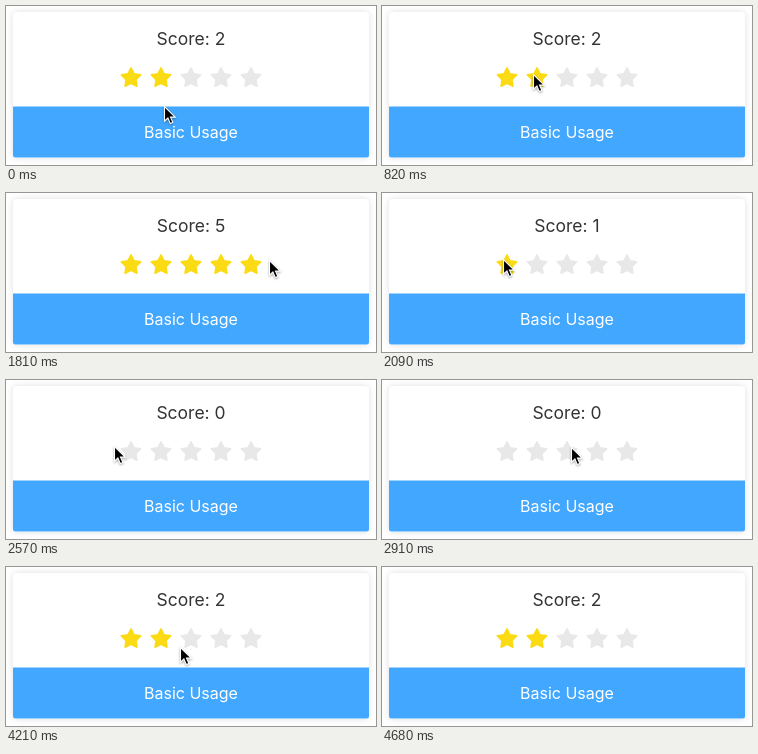
An HTML page that plays this animation: 370 px wide and 159 px high, repeating every 5230 ms.

```html
<!DOCTYPE html>
<html lang="en">
<head>
<meta charset="utf-8">
<title>Star rating</title>
<style>
  html, body { margin: 0; height: 100%; overflow: hidden; background: #fff; }
  svg { display: block; width: 370px; height: 159px; }
  text { font-family: Inter, sans-serif; text-anchor: middle; }
  .card { fill: #fff; filter: drop-shadow(0 0 3px rgba(0, 0, 0, .13)); }
  .star { stroke-width: 1.6; stroke-linejoin: round; }
</style>
</head>
<body>
<svg viewBox="0 0 370 159">
  <rect class="card" x="7" y="6" width="356" height="146" rx="4"/>
  <path d="M7 100.5H363V149q0 2.5-2.5 2.5H9.5Q7 151.5 7 149z" fill="#42a7ff"/>
  <text id="score" x="185" y="39" font-size="17.5" fill="#333"></text>
  <text x="185" y="132" font-size="16" fill="#fff">Basic Usage</text>
  <g id="stars"></g>
  <g id="cursor" style="filter: drop-shadow(0 1px 1px rgba(0, 0, 0, .35))">
    <path d="M.5 .5V15.2L3.9 12 6.3 17.6 8.9 16.5 6.5 11.1H11.2z" fill="#000" stroke="#fff" stroke-width="1.1"/>
  </g>
</svg>
<script>
const LOOP = 5230;
const scoreText = document.getElementById('score');
const starGroup = document.getElementById('stars');
const cursor = document.getElementById('cursor');

const linear = p => p;
const smooth = p => p * p * (3 - 2 * p);
const cubic = p => p < .5 ? 4 * p ** 3 : 1 - 4 * (1 - p) ** 3;

// Pointer moves: begin and end in ms, picture steps, destination, easing
const moves = [
  { begin: 420, end: 820, steps: 8, x: 151, y: 68, ease: smooth },
  { begin: 1180, end: 1690, steps: 9, x: 271, y: 67, ease: smooth, drag: true },
  { begin: 1750, end: 2210, steps: 9, x: 95, y: 66, ease: cubic, drag: true },
  { begin: 2570, end: 3020, steps: 9, x: 216, y: 67, ease: linear },
  { begin: 3380, end: 3560, steps: 4, x: 149, y: 69, ease: smooth },
  { begin: 3730, end: 3850, steps: 3, x: 151, y: 69, ease: linear },
  { begin: 4210, end: 4680, steps: 9, x: 354, y: 164, ease: linear }
];
const clicks = [{ at: 3140, score: 4 }, { at: 3790, score: 2 }];

const stars = Array.from({ length: 5 }, (_, i) => {
  const star = document.createElementNS('http://www.w3.org/2000/svg', 'polygon');
  const points = Array.from({ length: 10 }, (_, k) => {
    const radius = k % 2 ? 5.2 : 10.1, angle = k * Math.PI / 5;
    return [125 + 30 * i + radius * Math.sin(angle), 72 - radius * Math.cos(angle)];
  });
  star.setAttribute('points', points.join(' '));
  star.setAttribute('class', 'star');
  return starGroup.appendChild(star);
});

const scoreAt = x => Math.max(0, Math.min(5, Math.ceil((x - 114) / 30)));

function stateAt(time) {
  let x = 158, y = 100, score = 2;
  for (const move of moves) {
    if (time < move.begin) break;
    const interval = (move.end - move.begin) / (move.steps - 1);
    const step = Math.min(move.steps, Math.floor((time - move.begin) / interval + .01) + 1);
    const progress = move.ease(step / move.steps);
    x += (move.x - x) * progress;
    y += (move.y - y) * progress;
    if (move.drag) score = scoreAt(x);
  }
  for (const click of clicks) if (time >= click.at) score = click.score;
  return { x, y, score };
}

function draw() {
  const { x, y, score } = stateAt(performance.now() % LOOP);
  scoreText.textContent = `Score: ${score}`;
  stars.forEach((star, i) => {
    const color = i < score ? '#fadb14' : '#e8e8e8';
    star.setAttribute('fill', color);
    star.setAttribute('stroke', color);
  });
  cursor.setAttribute('transform', `translate(${Math.round(x)} ${Math.round(y)})`);
  requestAnimationFrame(draw);
}
draw();
</script>
</body>
</html>
```
